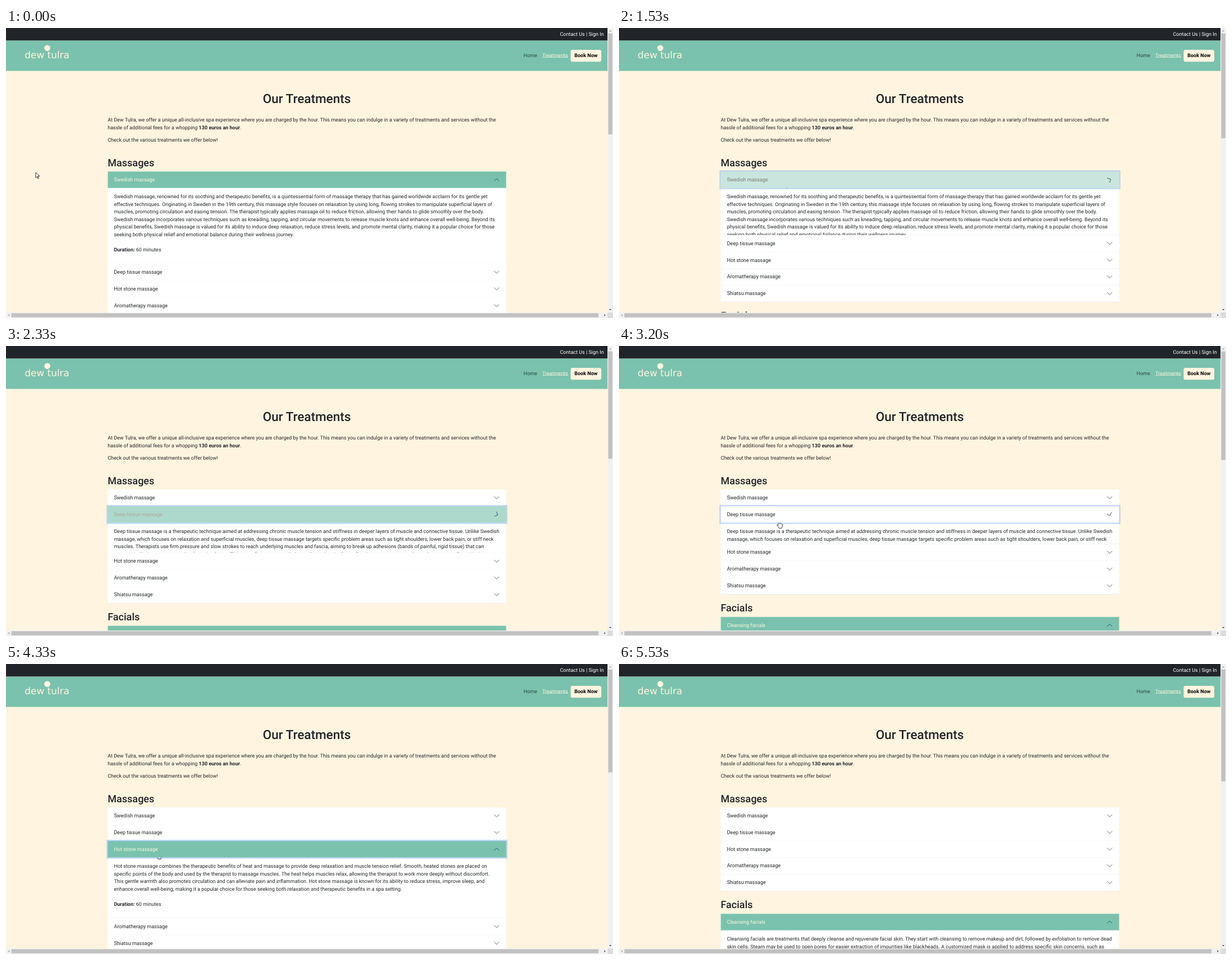
An HTML page that plays this animation: 1082 by 518 pixels, repeating every 5740 ms.

```html
<!DOCTYPE html>
<html lang="en">
<head>
<meta charset="utf-8">
<title>Our Treatments</title>
<style>
  :root { --ink: #212529; --teal: #7ac2ad; --cream: #fff4df; --line: #dee2e6; }
  html, body { margin: 0; width: 100%; height: 100%; overflow: hidden; }
  * { box-sizing: border-box; }
  #stage {
    position: absolute; width: 1920px; height: 920px; overflow: hidden;
    transform: scale(calc(1082 / 1920)); transform-origin: 0 0;
    background: #f1f1f1; color: var(--ink);
    font: 16px/24px Roboto, sans-serif; white-space: nowrap;
    text-rendering: geometricPrecision;
  }
  #page { position: absolute; width: 1903px; height: 902px; overflow: hidden; background: var(--cream); }
  #top { height: 40px; padding-right: 12px; background: var(--ink); color: #fff; line-height: 39px; text-align: right; }
  nav { position: absolute; top: 40px; width: 100%; height: 96px; background: var(--teal); }
  nav > * { position: absolute; top: 35px; }
  .dot { left: 120.5px; top: 13.5px; width: 19px; height: 19px; border-radius: 50%; background: var(--cream); }
  .brand { left: 59px; top: 26px; font: 30px/40px "DejaVu Sans", sans-serif; color: var(--cream); }
  .book { left: 1786px; top: 29px; width: 97px; height: 38px; border-radius: 6px; background: var(--cream);
    color: #000; font-weight: 700; line-height: 38px; text-align: center; }
  h1 { position: absolute; top: 200px; width: 100%; margin: 0; font: 500 40px/48px Roboto, sans-serif; text-align: center; }
  main { position: absolute; left: 321.5px; top: 280px; width: 1260px; }
  main > p { margin: 0 0 16px; }
  h2 { margin: 24px 0 8px; font: 500 32px/38.4px Roboto, sans-serif; }
  .list { border-top: 1px solid var(--line); }
  .item { background: #fff; border-bottom: 1px solid var(--line); }
  button { display: block; position: relative; width: 100%; height: 52px; padding: 0 20px; border: 0;
    background: #fff; color: inherit; font: inherit; text-align: left; }
  button svg { position: absolute; right: 20px; top: 16px; width: 20px; height: 20px; fill: none; stroke-linecap: round; stroke-linejoin: round; }
  .panel { overflow: hidden; }
  .panel p { margin: 0; padding: 16px 20px 32px; }
  .over { position: absolute; left: 0; top: 0; pointer-events: none; }
  #cursor { overflow: visible; fill: #fff; stroke: #000; stroke-width: 1.4; stroke-linejoin: round; }
</style>
</head>
<body>
<div id="stage">
  <div id="page">
    <div id="top">Contact Us | Sign In</div>
    <nav>
      <i class="dot"></i><span class="brand">dew tulra</span>
      <span style="left:1637px;color:rgb(0 0 0/.65)">Home</span>
      <u style="left:1696.5px;color:var(--cream)">Treatments</u>
      <span class="book">Book Now</span>
    </nav>
    <h1>Our Treatments</h1>
    <main>
      <p>At Dew Tulra, we offer a unique all-inclusive spa experience where you are charged by the hour. This means you can indulge in a variety of treatments and services without the<br>hassle of additional fees for a whopping <b>130 euros an hour</b>.</p>
      <p>Check out the various treatments we offer below!</p>
      <h2 style="margin-top:40px">Massages</h2>
      <div class="list" id="massages"></div>
      <h2>Facials</h2>
      <div class="list" id="facials"></div>
    </main>
  </div>
  <svg class="over" width="1920" height="920">
    <rect x="1903" y="902" width="17" height="18" fill="#dcdcdc"/>
    <g fill="#c1c1c1">
      <rect id="thumb" x="1905" y="17" width="13"/>
      <rect x="17" y="904" width="1857" height="13"/>
    </g>
    <path d="M1907.5 11h8l-4-4zM11 906.500v8l-4-4z" fill="#a3a3a3"/>
    <path d="M1907.5 891h8l-4 4zM1892.500 906.500v8l4-4z" fill="#505050"/>
  </svg>
  <svg class="over" id="cursor" width="1" height="1"><path/></svg>
</div>
<script>
const LOOP = 5740, FPS = 15, SCALE = 1082 / 1920;
const $ = id => document.getElementById(id);

// toggles: click times that flip the panel; focus: [gained, lost]
const massages = [
  { title: 'Swedish massage', open: true, toggles: [1450], focus: [1330, 2130], instantRing: true, lines: [
    'Swedish massage, renowned for its soothing and therapeutic benefits, is a quintessential form of massage therapy that has gained worldwide acclaim for its gentle yet',
    'effective techniques. Originating in Sweden in the 19th century, this massage style focuses on relaxation by using long, flowing strokes to manipulate superficial layers of',
    'muscles, promoting circulation and easing tension. The therapist typically applies massage oil to reduce friction, allowing their hands to glide smoothly over the body.',
    'Swedish massage incorporates various techniques such as kneading, tapping, and circular movements to release muscle knots and enhance overall well-being. Beyond its',
    'physical benefits, Swedish massage is valued for its ability to induce deep relaxation, reduce stress levels, and promote mental clarity, making it a popular choice for those',
    'seeking both physical relief and emotional balance during their wellness journey.'] },
  { title: 'Deep tissue massage', toggles: [2248, 3050], focus: [2130, 3790], lines: [
    'Deep tissue massage is a therapeutic technique aimed at addressing chronic muscle tension and stiffness in deeper layers of muscle and connective tissue. Unlike Swedish',
    'massage, which focuses on relaxation and superficial muscles, deep tissue massage targets specific problem areas such as tight shoulders, lower back pain, or stiff neck',
    'muscles. Therapists use firm pressure and slow strokes to reach underlying muscles and fascia, aiming to break up adhesions (bands of painful, rigid tissue) that can',
    'cause pain, limit movement, and reduce circulation. This type of massage can help to relieve chronic discomfort, improve posture, and speed up recovery from injuries.',
    'Although some soreness may follow a session, many people find that deep tissue massage restores mobility, lowers stress, and supports the long-term health of their',
    'muscles and joints.'] },
  { title: 'Hot stone massage', toggles: [3940, 4590], focus: [3790, 5370], lines: [
    'Hot stone massage combines the therapeutic benefits of heat and massage to provide deep relaxation and muscle tension relief. Smooth, heated stones are placed on',
    'specific points of the body and used by the therapist to massage muscles. The heat helps muscles relax, allowing the therapist to work more deeply without discomfort.',
    'This gentle warmth also promotes circulation and can alleviate pain and inflammation. Hot stone massage is known for its ability to reduce stress, improve sleep, and',
    'enhance overall well-being, making it a popular choice for those seeking both relaxation and therapeutic benefits in a spa setting.'] },
  { title: 'Aromatherapy massage' },
  { title: 'Shiatsu massage' }
];
const facials = [
  { title: 'Cleansing facials', open: true, lines: [
    'Cleansing facials are treatments that deeply cleanse and rejuvenate facial skin. They start with cleansing to remove makeup and dirt, followed by exfoliation to remove dead',
    'skin cells. Steam may be used to open pores for easier extraction of impurities like blackheads. A customized mask is applied to address specific skin concerns, such as'] }
];

const cursorPath = [
  [350, 53, 258], [650, 150, 276], [933, 264, 277], [1200, 296.5, 268], [1450, 296.5, 268],
  [1867, 299, 287], [2133, 290.5, 297], [2340, 290.5, 297], [2600, 288, 304], [2760, 288, 341],
  [2933, 286.5, 311], [3133, 286, 311.5], [3200, 285, 312], [3533, 271, 335], [4660, 271, 335],
  [5080, 14, 506], [5100, -50, 600]
];
const cursorShapes = {
  arrow: 'M0 0v17l4-4 3 6.500 2.500-1-3-6.500h6z',
  hand: 'M-2 14V2a2 2 0 0 1 4 0v7a2 2 0 0 1 3.500 .5a2 2 0 0 1 3 .8a2 2 0 0 1 2.500 1.500v5c0 3-2 4-2 7H0c0-3-3-5-5-8c-1.500-2.500 0-4 3-1z',
  text: 'M-3-9h2l1 1 1-1h2M0-8V8M-3 9h2l1-1 1 1h2'
};

const clamp = v => Math.min(1, Math.max(0, v));

function bezier(x1, y1, x2, y2) {
  const at = (a, b, u) => 3 * a * u * (1 - u) ** 2 + 3 * b * u * u * (1 - u) + u ** 3;
  return x => {
    if (x <= 0 || x >= 1) return clamp(x);
    let lo = 0, hi = 1;
    for (let i = 0; i < 24; i++) {
      const mid = (lo + hi) / 2;
      if (at(x1, x2, mid) < x) lo = mid; else hi = mid;
    }
    return at(y1, y2, lo);
  };
}
const ease = bezier(.25, .1, .25, 1);
const easeInOut = bezier(.42, 0, .58, 1);

function build(list, items) {
  for (const item of items) {
    const el = document.createElement('div');
    el.className = 'item';
    el.innerHTML = `<button tabindex="-1">${item.title}<svg viewBox="0 0 16 16"><path d="M2 5l6 6 6-6"/></svg></button>
      <div class="panel">${item.lines ? `<p>${item.lines.join('<br>')}<br><br><b>Duration:</b> 60 minutes</p>` : ''}</div>`;
    list.append(el);
    item.button = el.querySelector('button');
    item.icon = el.querySelector('svg');
    item.panel = el.querySelector('.panel');
    item.full = item.lines ? (item.lines.length + 2) * 24 + 48 : 0;
  }
}

function drawItem(item, t) {
  const past = (item.toggles || []).filter(s => s <= t);
  const open = !!item.open !== (past.length % 2 === 1);
  const since = past.length ? t - past.at(-1) : Infinity;
  const amount = (curve, ms) => { const p = curve(since / ms); return open ? p : 1 - p; };

  const height = item.full * amount(ease, 350);
  item.panel.style.height = height + 'px';

  const tint = amount(easeInOut, 150);
  const { style } = item.button;
  style.backgroundColor = `color-mix(in srgb, var(--teal) ${tint * 100}%, #fff)`;
  style.color = `color-mix(in srgb, var(--cream) ${tint * 100}%, var(--ink))`;
  item.icon.style.transform = `rotate(${-180 * amount(easeInOut, 200)}deg)`;
  item.icon.style.stroke = open ? '#052c65' : '#212529';

  const [gained, lost] = item.focus || [Infinity, Infinity];
  const fadeIn = item.instantRing ? +(t >= gained) : easeInOut((t - gained) / 150);
  const ring = fadeIn - easeInOut((t - lost) / 150);
  style.boxShadow = ring > 0 ? `0 0 0 ${4 * ring}px rgb(13 110 253 / ${.25 * ring})` : 'none';
  style.zIndex = ring > 0 ? 3 : 0;
  return height;
}

function drawCursor(t) {
  let i = cursorPath.findIndex(point => point[0] > t);
  if (i < 0) i = cursorPath.length - 1;
  const [t1, x1, y1] = cursorPath[i];
  const [t0, x0, y0] = cursorPath[Math.max(0, i - 1)];
  const p = t1 > t0 ? clamp((t - t0) / (t1 - t0)) : 0;
  const x = x0 + (x1 - x0) * p, y = y0 + (y1 - y0) * p;
  const under = document.elementFromPoint(x, y);
  const kind = under?.closest('button') ? 'hand' : under?.closest('.panel p') ? 'text' : 'arrow';
  $('cursor').firstChild.setAttribute('d', cursorShapes[kind]);
  $('cursor').style.transform = `translate(${x / SCALE}px, ${y / SCALE}px)`;
}

function draw(now) {
  const t = Math.floor((now % LOOP + 4) * FPS / 1000) * 1000 / FPS;
  const opened = massages.reduce((sum, item) => sum + drawItem(item, t), 0);
  $('thumb').setAttribute('height', 902 * 868 / (2206 + opened));
  drawCursor(t);
}

build($('massages'), massages);
build($('facials'), facials);
drawItem(facials[0], 0);

const start = performance.now();
function tick() {
  draw(performance.now() - start);
  requestAnimationFrame(tick);
}
tick();
</script>
</body>
</html>
```
